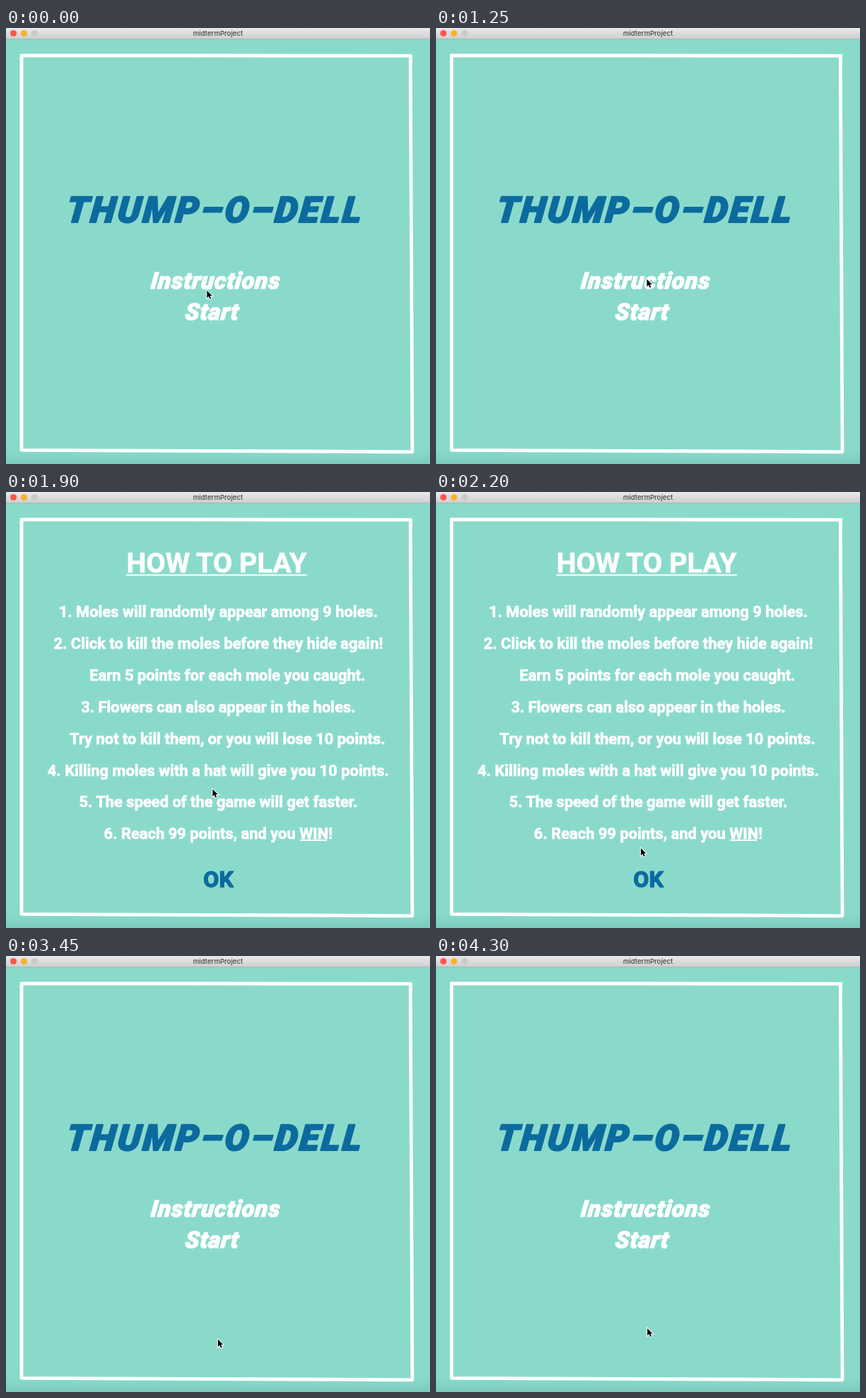
An HTML page for the animation above (4.35 s loop, 600 by 617 pixels).

```html
<!DOCTYPE html>
<html lang="en">
<head>
<meta charset="utf-8">
<title>midtermProject</title>
<style>
  html, body { margin: 0; width: 100%; height: 100%; overflow: hidden; }
  svg { display: block; width: 600px; height: 617px; }
  text { font-family: Roboto, sans-serif; font-weight: 700; text-anchor: middle;
         stroke-linejoin: round; }
  .bar { font: 500 9.6px Inter, sans-serif; fill: #444; }
  .white { fill: #fff; stroke: #fff; stroke-width: .7; }
  .blue { fill: #0c6b9e; stroke: #0c6b9e; stroke-width: 1.3; }
  .menu { font-weight: 900; font-style: italic; stroke-width: 1.2;
          transform-box: fill-box; transform-origin: center; transform: skewX(-6deg); }
  .line { fill: none; stroke: #fff; stroke-width: 2; }
</style>
</head>
<body>
<svg viewBox="0 0 600 617">
  <defs>
    <linearGradient id="chrome" x2="0" y2="1">
      <stop stop-color="#e9e9e9"/><stop offset="1" stop-color="#cfcfcf"/>
    </linearGradient>
    <linearGradient id="shade" x2="0" y2="1">
      <stop stop-color="#7fcfc1" stop-opacity="0"/><stop offset="1" stop-color="#7bc9bb"/>
    </linearGradient>
  </defs>
  <rect width="600" height="617" fill="#8adacc"/>
  <rect y="597" width="600" height="20" fill="url(#shade)"/>
  <rect width="600" height="15" fill="url(#chrome)"/>
  <rect y="15" width="600" height="1" fill="#aab5b2"/>
  <circle cx="10.5" cy="7.5" r="4.6" fill="#fc5650"/>
  <circle cx="25.5" cy="7.5" r="4.6" fill="#f6b32c"/>
  <circle cx="40.5" cy="7.5" r="4.6" fill="#cacaca"/>
  <text class="bar" x="300" y="11">midtermProject</text>
  <path d="M573 39.3L22 38.8V597.3L575 599.8L572.3 40" fill="none" stroke="#fff"
        stroke-width="4.8" stroke-linejoin="round" stroke-linecap="round"/>

  <g id="menu">
    <text class="blue menu" x="296.5" y="275.5" font-size="51" letter-spacing="3.1" style="stroke-width:2">THUMP–O–DELL</text>
    <text class="white menu" x="297" y="369" font-size="33" letter-spacing=".8">Instructions</text>
    <text class="white menu" x="292" y="413" font-size="33" letter-spacing=".8">Start</text>
  </g>

  <g id="help">
    <text class="white" x="298" y="114" font-size="39.5">HOW TO PLAY</text>
    <path class="line" d="M170 117.5H426M416 492.8H454"/>
    <g id="rules" font-size="21.9"></g>
    <text class="blue" x="300.5" y="559" font-size="32">OK</text>
  </g>

  <path id="cursor" d="M.4 .6V11L2.8 8.8L4.5 12.6L6.2 11.8L4.6 8.1H7.8Z"
        stroke="#fff" stroke-width="2" paint-order="stroke"/>
</svg>
<script>
const LOOP = 4350, STEP = 50, HELP_OPEN = 1300, HELP_CLOSE = 3450;
const $ = id => document.getElementById(id);

const rules = [
  '1. Moles will randomly appear among 9 holes.',
  '2. Click to kill the moles before they hide again!',
  '  Earn 5 points for each mole you caught.',
  '3. Flowers can also appear in the holes.',
  '  Try not to kill them, or you will lose 10 points.',
  '4. Killing moles with a hat will give you 10 points.',
  '5. The speed of the game will get faster.',
  '6. Reach 99 points, and you WIN!'
];
$('rules').innerHTML = rules.map((rule, i) =>
  `<text class="white" x="${rule[0] === ' ' ? 313.3 : 300.4}" y="${177.3 + 44.85 * i}">${rule.trim()}</text>`
).join('');

// Pointer path: time, x, y
const path = [
  [0, 284, 371], [550, 298, 355], [1750, 298, 355], [1900, 292, 420],
  [2100, 287, 484], [2300, 292, 523], [2600, 299.5, 542],
  [3950, 299.5, 542], [4300, 298.7, 526.3], [LOOP, 298.7, 526.3]
];

function pointerAt(t) {
  const i = path.findIndex(key => key[0] > t);
  const [t0, x0, y0] = path[i - 1], [t1, x1, y1] = path[i];
  const k = (t - t0) / (t1 - t0);
  return [x0 + (x1 - x0) * k, y0 + (y1 - y0) * k];
}

function draw() {
  const t = Math.floor(performance.now() % LOOP / STEP) * STEP;
  const help = t >= HELP_OPEN && t < HELP_CLOSE;
  $('help').style.display = help ? '' : 'none';
  $('menu').style.display = help ? 'none' : '';
  $('cursor').setAttribute('transform', `translate(${pointerAt(t)})`);
  requestAnimationFrame(draw);
}
draw();
</script>
</body>
</html>
```
